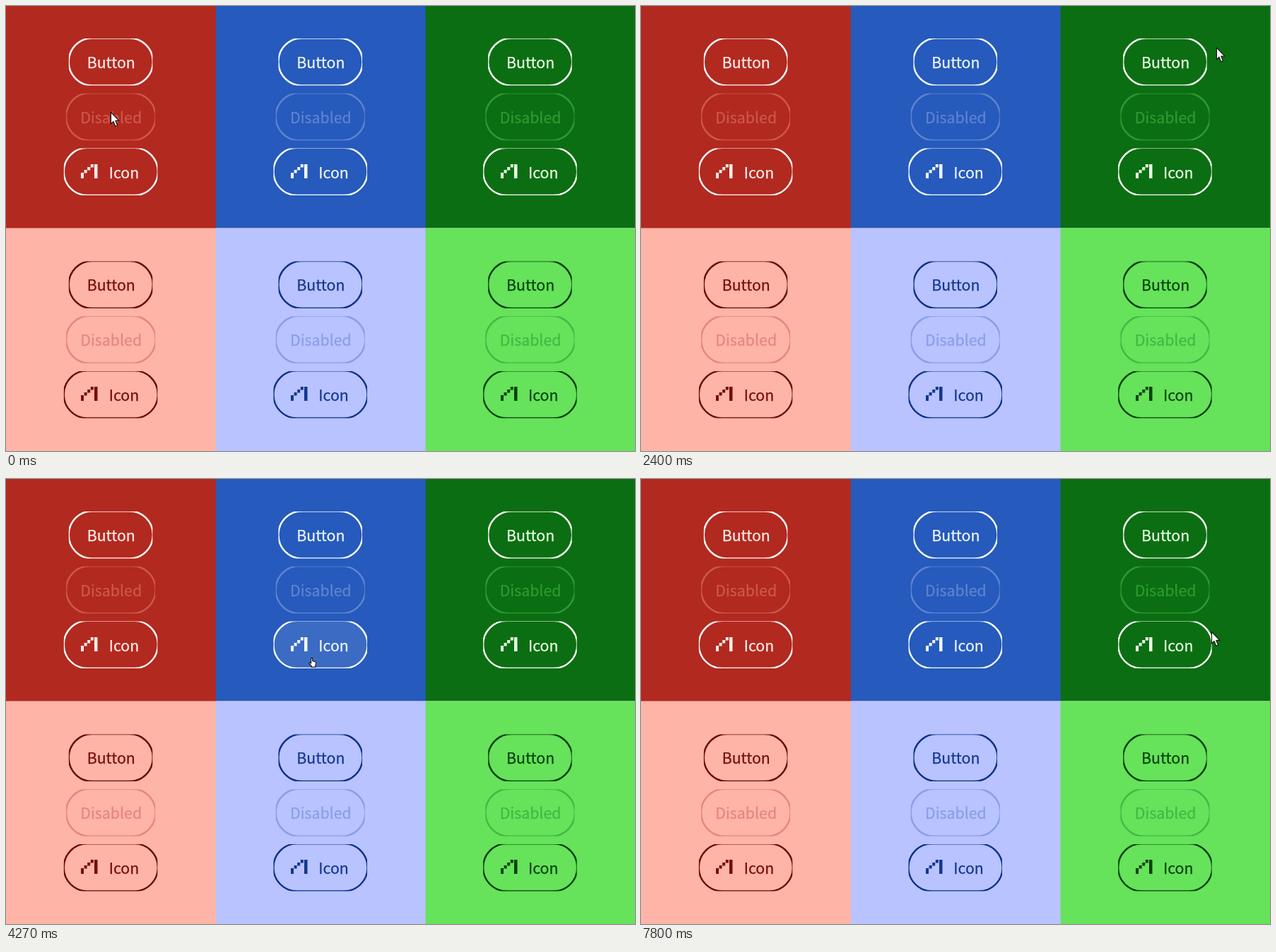
Recreate the animation shown at these times as an HTML page with a canvas. Size 890 by 630 pixels, loop 8000 ms.

```html
<!DOCTYPE html>
<html lang="en">
<head>
<meta charset="utf-8">
<title>Button themes</title>
<style>
  html, body { margin: 0; width: 100%; height: 100%; overflow: hidden; }
  canvas { display: block; width: 890px; height: 630px; }
</style>
</head>
<body>
<canvas id="stage" width="890" height="630"></canvas>
<script>
const ctx = document.getElementById('stage').getContext('2d');
const LOOP = 8000, TICK = 1000 / 15, HEIGHT = 67, PITCH = 77.7;

const panels = [
  { bg: '#b2291f', fg: '#ffffff', text: '#ffedea', off: '#cd584d', press: .89 },
  { bg: '#265abc', fg: '#faffff', text: '#eff7fd', off: '#5f84d1', press: .89 },
  { bg: '#0c6e12', fg: '#ffffff', text: '#eaffe6', off: '#2e9a32', press: .89 },
  { bg: '#feb4a7', fg: '#690a06', text: '#750f0b', off: '#e4877c', press: .95 },
  { bg: '#b8c3ff', fg: '#0d3089', text: '#15378f', off: '#8a9ee6', press: .95 },
  { bg: '#66e25b', fg: '#04400a', text: '#06420b', off: '#43b843', press: .95 },
];
const buttons = [
  { label: 'Button', width: 119 },
  { label: 'Disabled', width: 126.5, disabled: true },
  { label: 'Icon', width: 133, icon: true },
];

// Pointer moves: depart tick, arrive tick, x, y; it rests in between
const moves = [
  [0, 3, 150, 8], [3, 5, 149, 72],
  [13, 16, 548, 113], [16, 23, 445, 80],
  [31, 35, 850, 48], [35, 38, 742, 80],
  [48, 53, 430, 212],
  [63, 69, 446, 457], [69, 71, 446, 434], [72, 74, 446, 385],
  [80, 85, 457, 172], [87, 90, 440, 148],
  [104, 106, 1040, 310], [109, 110, 880, 262], [110, 117, 807, 216],
];
// Double clicks: tick of the first press, ticks held
const clicks = [[8, 1], [25, 2], [42, 2], [57, 2], [76, 1]];
const CLICK_GAP = 4;

function pointerAt(tick) {
  let x = 148, y = 150;
  for (const [depart, arrive, toX, toY] of moves) {
    const k = Math.min(1, Math.max(0, (tick - depart) / (arrive - depart)));
    x += (toX - x) * k;
    y += (toY - y) * k;
  }
  return [x, y];
}

const isDown = tick => clicks.some(([first, held]) =>
  [first, first + CLICK_GAP].some(t => tick >= t && tick < t + held));

const centerX = p => (p % 3 + .5) * 890 / 3;
const rowY = (p, row) => 79 + (p > 2 ? 315.5 : 0) + row * PITCH;

function hit([x, y]) {
  for (let p = 0; p < 6; p++)
    for (let row = 0; row < 3; row++)
      if (!buttons[row].disabled && Math.abs(x - centerX(p)) < buttons[row].width / 2 - 2 &&
          Math.abs(y - rowY(p, row)) < HEIGHT / 2) return p * 3 + row;
  return -1;
}

function pill(x, y, w, inset) {
  ctx.beginPath();
  ctx.roundRect(x + inset, y + inset, w - 2 * inset, HEIGHT - 2 * inset, 33 - inset);
}

function drawIcon(x, y) {
  for (let i = 0; i < 4; i++) ctx.fillRect(x + i * 4.6, y + 12 - i * 4, 4, i ? 4.5 : 8);
  ctx.fillRect(x + 19, y, 4.5, 20);
}

function drawButton(p, row, state, shift) {
  const theme = panels[p], b = buttons[row], cx = centerX(p);
  const x = cx - b.width / 2, y = rowY(p, row) - HEIGHT / 2 + shift;
  if (state) {
    ctx.globalAlpha = state === 'press' ? theme.press : .1;
    ctx.fillStyle = theme.fg;
    pill(x, y, b.width, 1.3);
    ctx.fill();
    ctx.globalAlpha = 1;
  }
  if (state !== 'press') {
    // The outline straddles the box, which cuts its straight sides in half
    ctx.save();
    ctx.beginPath();
    ctx.rect(x, y + .5, b.width - .5, HEIGHT - .5);
    ctx.clip();
    ctx.strokeStyle = b.disabled ? theme.off : theme.fg;
    ctx.lineWidth = 2.4;
    pill(x, y, b.width, 0);
    ctx.stroke();
    ctx.restore();
  }
  const base = 88 + (p > 2 ? 315 : 0) + row * 78 + shift;
  const textX = cx + (b.icon ? 18.6 : .4);
  ctx.fillStyle = ctx.strokeStyle = b.disabled ? theme.off : theme.text;
  ctx.lineWidth = .25;
  ctx.fillText(b.label, textX, base);
  ctx.strokeText(b.label, textX, base);
  if (b.icon) drawIcon(Math.round(cx) - 42, base - 20);
}

const arrow = new Path2D('M.5 .5V17L4 13.5L6.8 20.2L9.6 19L6.8 12.4H12Z');
const hand = new Path2D('M3.5 1.2Q4.8 -.2 5.6 1.4V5L9.2 6Q10.7 6.5 10.4 8.3L9.6 11.2V13.5H4V11.7L.8 8.2Q.4 6.8 1.8 6.8L3.5 8.2Z');

function drawPointer(x, y, isHand) {
  ctx.save();
  ctx.translate(isHand ? x - 4.5 : x, y);
  ctx.lineJoin = 'round';
  ctx.lineWidth = 1.1;
  ctx.strokeStyle = '#111';
  ctx.fillStyle = '#fff';
  const shape = isHand ? hand : arrow;
  ctx.fill(shape);
  ctx.stroke(shape);
  ctx.restore();
}

function draw(ms) {
  const tick = Math.floor((ms % LOOP + 4) / TICK) % 120;
  const pointer = pointerAt(tick), over = hit(pointer);
  const hovered = hit(pointerAt(Math.max(0, tick - 1)));  // hover lags one tick
  const down = isDown(tick);
  ctx.font = '21.33px "Noto Sans CJK SC", "Noto Sans CJK JP", "Noto Sans CJK", "Noto Sans", sans-serif';
  ctx.textAlign = 'center';
  panels.forEach((theme, p) => {
    ctx.fillStyle = theme.bg;
    ctx.fillRect(p % 3 * 296.85, p > 2 ? 314.4 : 0, 890, 630);
  });
  panels.forEach((theme, p) => {
    const pressed = down && Math.floor(hovered / 3) === p ? hovered % 3 : -1;
    buttons.forEach((b, row) => {
      const active = hovered === p * 3 + row;
      const shift = pressed < 0 ? 0 : Math.sign(pressed - row);
      drawButton(p, row, active ? (down ? 'press' : 'hover') : '', shift);
    });
  });
  drawPointer(...pointer, over >= 0 || (tick >= 89 && tick < 105));
}

const start = performance.now();
function loop() {
  draw(performance.now() - start);
  requestAnimationFrame(loop);
}
loop();
</script>
</body>
</html>
```
